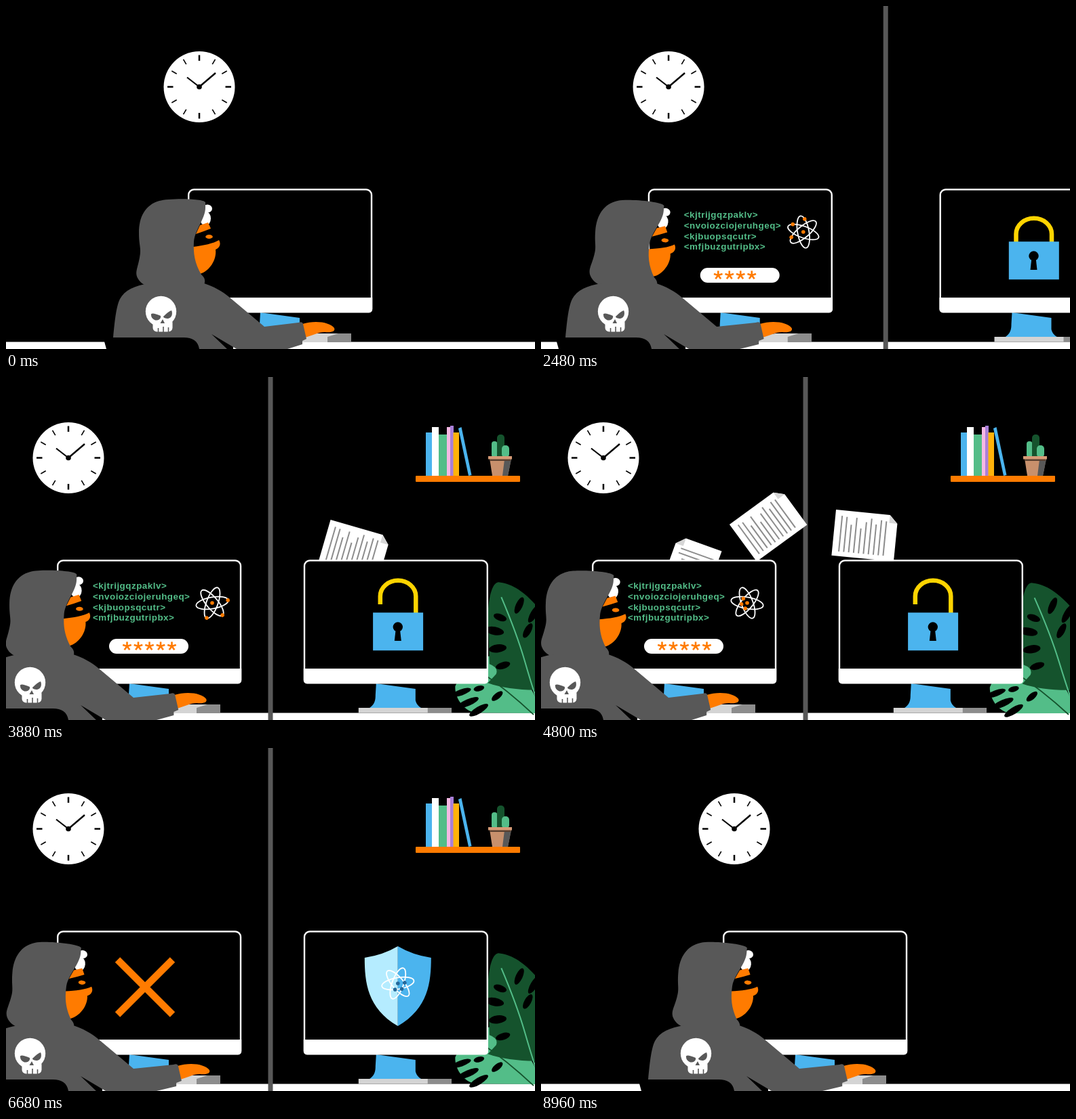
Animation of 780x507 px, one loop 9 s. Source, as an HTML page with a canvas:

```html
<!DOCTYPE html>
<html>
<head>
<meta charset="utf-8">
<style>
html, body { margin: 0; height: 100%; overflow: hidden; background: #000; }
canvas { display: block; }
</style>
</head>
<body>
<canvas id="stage" width="780" height="507"></canvas>
<script>
const LOOP = 9000, TAU = Math.PI * 2, RAD = Math.PI / 180;
const ORANGE = '#ff7b00', GRAY = '#585858', BLUE = '#4bb4ee', GREEN = '#53bd88',
  FOREST = '#15532d', WHITE = '#fff', YELLOW = '#ffd400', BLACK = '#000';
const c = document.getElementById('stage').getContext('2d');

const clamp = x => Math.max(0, Math.min(1, x));
const ramp = (t, start, length) => clamp((t - start) / length);
const ease = u => u < .5 ? 4 * u ** 3 : 1 - 4 * (1 - u) ** 3;
const wave = (t, period) => (1 - Math.cos(TAU * t / period)) / 2;

// 0 = opening view, 1 = split view
const pan = (t, into, back) => ease(ramp(t, into, 1360)) - ease(ramp(t, back, 700));

function at(x, y, draw, angle = 0, scale = 1) {
  if (!scale) return;
  c.save();
  c.translate(x, y);
  c.rotate(angle * RAD);
  c.scale(scale, scale);
  draw();
  c.restore();
}
function about(x, y, angle, draw) {
  at(x, y, () => at(-x, -y, draw), angle);
}
function fill(path, color) {
  c.fillStyle = color;
  c.fill(new Path2D(path));
}
function line(path, color, width) {
  c.strokeStyle = color;
  c.lineWidth = width;
  c.stroke(new Path2D(path));
}
function rect(x, y, w, h, color, r = 0) {
  c.fillStyle = color;
  c.beginPath();
  c.roundRect(x, y, w, h, r);
  c.fill();
}
function oval(x, y, rx, ry, color, angle = 0) {
  c.fillStyle = color;
  c.beginPath();
  c.ellipse(x, y, rx, ry, angle * RAD, 0, TAU);
  c.fill();
}

function clock() {
  oval(0, 0, 52.5, 52.5, WHITE);
  for (let i = 0; i < 12; i++)
    at(0, 0, () => line('M0-38.5V-47', BLACK, i % 3 ? 1.6 : 2.5), i * 30);
  line('M0 0L-18-14', BLACK, 2.2);
  line('M0 0L24-20.5', BLACK, 2.4);
  oval(0, 0, 3.8, 3.8, BLACK);
}

// Turns slowly as a whole while the electrons run along their orbits
function atom(t, dots) {
  const age = t - 3880, phase = age * .1014 * RAD;
  const orbits = [-10, 50, 110].map(tilt => tilt + age * .0214);
  for (const tilt of orbits) {
    c.strokeStyle = WHITE;
    c.lineWidth = 1.8;
    c.beginPath();
    c.ellipse(0, 0, 24, 8.5, tilt * RAD, 0, TAU);
    c.stroke();
  }
  oval(0, 0, 2.8, 2.8, dots);
  for (const tilt of orbits)
    at(0, 0, () => oval(23.5 * Math.cos(phase), 8.5 * Math.sin(phase), 2.8, 2.8, dots), tilt);
}

// Monitor with its top left corner at 0,271
function stand() {
  fill('M107 453L165 461V478C167 486 172 488 175 490H96C105 484 106 478 106 470Z', BLUE);
}
function monitor(screen) {
  rect(1.2, 271.2, 269.8, 180, BLACK, 8);
  c.strokeStyle = WHITE;
  c.lineWidth = 2.4;
  c.beginPath();
  c.roundRect(1.2, 271.2, 269.8, 180.6, [8, 8, 4, 4]);
  c.stroke();
  rect(0, 431, 272.2, 22.5, WHITE, [0, 0, 5, 5]);
  screen();
}

const CODE = ['<kjtrijgqzpaklv>', '<nvoiozciojeruhgeq>', '<kjbuopsqcutr>', '<mfjbuzgutripbx>'];
function hackScreen(t) {
  if (t < 6200) {
    c.fillStyle = GREEN;
    c.font = 'bold 13.4px "Liberation Sans", Arial, sans-serif';
    c.letterSpacing = '0.5px';
    CODE.forEach((row, i) => {
      const shown = Math.round(ramp(t, 200 + i * 300, 300) * row.length);
      c.fillText(row.slice(0, shown), 53, 313 + i * 15.8);
    });
    at(229, 334, () => atom(t, ORANGE), 0, ease(ramp(t, 400, 300)));
    at(135.5, 398, () => rect(-58.5, -11, 117, 22, WHITE, 11), 0, ease(ramp(t, 1300, 240)));
    const stars = Math.floor(clamp((t - 1360) / 1200) * 5);
    for (let i = 0; i < stars; i++)
      for (let k = 0; k < 5; k++)
        at(103.5 + i * 16.5, 398, () => line('M0 0V-6.6', ORANGE, 2.6), k * 72);
  }
  const cross = ease(ramp(t, 6200, 280)) - ease(ramp(t, 8480, 280));
  at(130, 353.5, () => line('M-40.5-40.5L40.5 40.5M40.5-40.5L-40.5 40.5', ORANGE, 10.5), 0, cross);
}

function lock(t) {
  const lift = 13 * ease(ramp(t, 3360, 240));
  line(`M113 ${349 - lift}V${337 - lift}A26 23 0 0 1 165.500 ${337 - lift}V350`, YELLOW, 6.5);
  rect(102.3, 348.3, 74, 56, BLUE);
  oval(139, 369.5, 7.2, 7.2, BLACK);
  fill('M136 372H142L144 390H134Z', BLACK);
}
function shield(t) {
  fill('M0-55Q-22-42-49-38C-49-2-45 37 0 63Z', '#b5ecff');
  fill('M0-55Q22-42 49-38C49-2 45 37 0 63Z', BLUE);
  atom(t, '#24689a');
}
function safeScreen(t) {
  at(139, 348, () => at(-139, -348, () => lock(t)), 0, 1 - ease(ramp(t, 6080, 200)));
  at(139, 348, () => shield(t), 0, ease(ramp(t, 6240, 280)));
}

function page() {
  fill('M-46-34H34L46-22V34H-46Z', WHITE);
  fill('M34-34V-22H46Z', '#d6d6d6');
  for (let i = 0; i < 10; i++) {
    const top = [-26, -25, -14, -25, -10, -20, -26, -18, -25, -24][i];
    line(`M${-36 + i * 7.300} ${top}V27`, '#8c8c8c', 2);
  }
}
function pages(t) {
  for (const start of [3882, 4245, 4690]) {
    const x = 513 - .32 * (t - start);
    if (x < 170 || x > 602) continue;
    at(x, 211 + .0028 * (x - 386) ** 2, page, 16 - .293 * (513 - x));
  }
}

function shelf() {
  rect(604, 146, 154, 9, ORANGE, 1);
  const books = [[619, 82, 10, BLUE], [628, 74, 10, WHITE], [638, 85, 12, GREEN],
    [650, 74, 6, '#f5b8e4'], [655, 72, 5, '#a97fd8'], [659.5, 82, 8.5, '#ffb30a']];
  for (const [x, y, w, color] of books) rect(x, y, w, 146 - y, color);
  fill('M667 76L671.500 74L686.500 145L682 146Z', BLUE);
  rect(716, 95, 8.5, 24, GREEN, 4);
  rect(724, 85, 11, 34, FOREST, 5);
  rect(731, 101, 11, 18, GREEN, 5);
  fill('M713 120H745L740 146H717Z', '#c8906c');
  fill('M735 122H745L740 146H732Z', GRAY);
  rect(713, 121, 31, 3, '#5a4030');
  rect(711, 117, 35, 4.6, '#d69b76');
}

function plant(t) {
  const sway = Math.cos(TAU * (t - 3880) / 2800);
  about(770, 500, sway * .5, () => {
    fill('M790 497H694C676 496 661 476 662 458C672 434 700 411 722 412C752 422 778 460 790 497Z', GREEN);
    const gaps = [[671, 467, 15, 4.5, -20], [681, 482, 17, 5, -24], [697, 493, 16, 5, -32],
      [697, 461, 8, 4, -15], [724, 472, 10, 4.5, -40]];
    for (const [x, y, rx, ry, tilt] of gaps) oval(x, y, rx, ry, BLACK, tilt);
    line('M700 437Q738 462 778 499', FOREST, 1.8);
  });
  about(790, 500, sway * .6, () => {
    fill('M709 352C710 325 715 305 724 304C746 306 768 320 795 356V462C765 464 733 461 710 453L722 440Q726 430 712 425Z', FOREST);
    const cuts = [[727, 356, 10, 5, 20], [719, 376, 14, 6, 10], [724, 402, 13, 6, -8], [732, 427, 11, 5, -18],
      [755, 338, 5, 13, 24], [768, 375, 5, 12, 28], [777, 350, 5, 15, 30]];
    for (const [x, y, rx, ry, tilt] of cuts) oval(x, y, rx, ry, BLACK, tilt);
    line('M728.500 326Q752 380 764 420T785 485', GREEN, 2);
  });
}

function head() {
  oval(297, 299.500, 7, 6, WHITE);
  oval(294, 314, 8, 10.5, WHITE);
  fill('M280 337L286 324L298 320L302 329Q292 333 280 337Z', ORANGE);
  oval(299.5, 341, 5.3, 3, ORANGE);
  fill('M276 356C291 354 306 351 314 346C317 351 316 357 309 360C311 375 300 392 286 396C279 385 276 370 276 356Z', ORANGE);
  fill('M294 290C290 284 240 284 226 288C205 294 196 312 196 335C196 355 200 358 197 372C194 388 190 393 194 402C198 410 206 414 215 416H290C295 408 294 402 288 397C278 380 276 365 277 348C279 330 294 314 294 298Z', GRAY);
}
function skull() {
  oval(228.5, 451.5, 22.7, 22.7, WHITE);
  rect(216.5, 462, 29, 19.5, WHITE, 6);
  fill('M214 457C213 453 219 454 228 458C229 463 224 465 220 464.500C216 463 214 460 214 457Z', GRAY);
  fill('M232 459Q240 451 244 450C246 454 245 461 239 462C235 462 232 461 232 459Z', GRAY);
  fill('M231 463L227.500 469H234Z', GRAY);
  line('M224.500 476V482M232 474V482M239.500 475V482', GRAY, 1.6);
}
function hacker(t) {
  const lean = t < 6630 ? wave(t, 1020) : 1;
  const reach = 9 * (t < 6700 ? wave(t, 536) : 1);
  about(235, 410, 4.8 * lean, head);
  at(reach, 0, () =>
    fill('M437 470C455 464 478 467 484 476C486 481 480 483 470 482C460 482 452 487 441 490Z', ORANGE));
  fill(`M158 490C160 470 162 445 168 433C175 420 190 413 212 410H292C305 414 320 422 330 431L381 474
    L${431 + reach} 468Q${437 + reach} 466 ${438 + reach} 470L${443 + reach} 492L${437 + reach * .8} 495V500
    L415 507H340L303 485L326 507H285C283 495 275 490 262 490Z`, GRAY);
  skull();
}

function draw(t) {
  const body = -193 * pan(t, 1735, 8113);
  const leftX = 268 - 193 * pan(t, 1767, 8186);
  const clockX = 285 - 193 * pan(t, 1800, 8260);
  const away = (into, back) => 410 * (1 - pan(t, into, back));
  const rightX = 438.8 + away(1732, 8029);

  c.fillStyle = BLACK;
  c.fillRect(0, 0, 780, 507);
  at(clockX, 119.5, clock);
  rect(0, 496.5, 780, 10.5, WHITE);
  at(body, 0, () => fill('M145 496L148 507H335V496Z', BLACK));
  at(away(1790, 8088), 0, shelf);
  at(away(1775, 8030), 0, () => plant(t));
  rect(386.5 + away(1687, 8029), 0, 7, 507, GRAY);
  pages(t);

  at(rightX, 0, () => {
    stand();
    rect(81, 489, 137, 7.5, '#d4d4d4');
    rect(183, 489, 35, 7.5, '#8c8c8c');
    monitor(() => safeScreen(t));
  });
  at(leftX, 0, () => {
    stand();
    fill('M150 497V490L188 484H241V497Z', '#d4d4d4');
    fill('M206 497V489L222 484H241V497Z', '#8c8c8c');
    monitor(() => hackScreen(t));
  });
  at(body, 0, () => hacker(t));
}

function frame() {
  draw(performance.now() % LOOP);
  requestAnimationFrame(frame);
}
frame();
</script>
</body>
</html>
```
